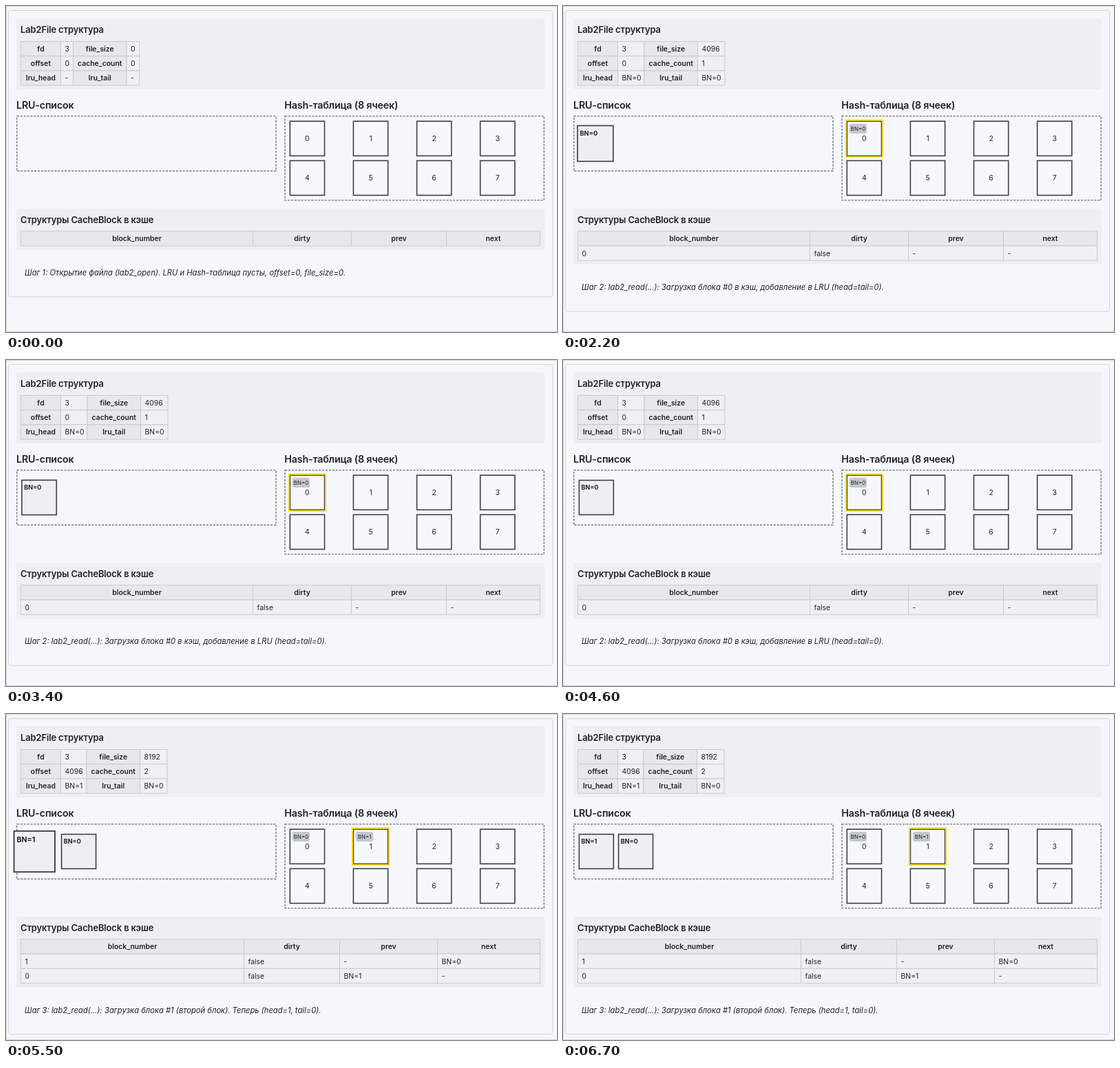
Animation of 800 by 473 pixels, one loop 8000 ms. Source, as an HTML page:

```html
<!DOCTYPE html>
<html lang="ru">
<head>
<meta charset="utf-8">
<style>
  html, body { margin: 0; width: 100%; height: 100%; overflow: hidden; background: #f5f7fb; }
  svg { display: block; width: 100vw; height: 100vh; }
  text { font: 10.4px Inter, sans-serif; fill: #1f2329; }
  .mid { text-anchor: middle; }
  .th { font-weight: 600; }
  .h3 { font-size: 13px; font-weight: 600; letter-spacing: -.15px; }
  .h2 { font-size: 14.3px; font-weight: 600; letter-spacing: -.2px; }
  .step { font-size: 11.2px; font-style: italic; }
  .label { font-size: 9px; font-weight: 700; }
  .tag { font-size: 7.9px; }
  .panel { fill: #eeeff2; }
  .frame { fill: none; stroke: #d3d5da; }
  .head { fill: #e8e8ea; stroke: #c9cacd; }
  .data { fill: #f0f0f3; stroke: #c9cacd; }
  .zone { fill: none; stroke: #85878c; stroke-width: 1.6; stroke-dasharray: 3.2 1.7; }
  .cell { fill: #f7f8fb; stroke: #3c4049; stroke-width: 1.6; }
  .block { fill: #eeeff2; stroke: #3c4049; stroke-width: 1.6; }
  .glow { fill: none; stroke: #f7d51d; stroke-width: 2; }
  .badge { fill: #c3c7ce; }
</style>
</head>
<body>
<svg id="stage" viewBox="0 0 800 473" preserveAspectRatio="none"></svg>
<script>
const LOOP = 8000, TICK = 100;

const scenes = [
  {
    cols: [21.5, 79.5, 97.5, 175, 193.5],
    info: [3, 0, 0, 0, '-', '-'],
    split: [21.5, 358.5, 501.5, 639.5, 775.5],
    rows: [], blocks: [],
    step: 'Шаг 1: Открытие файла (lab2_open). LRU и Hash-таблица пусты, offset=0, file_size=0.'
  },
  {
    start: 2110,
    cols: [21.5, 79.5, 118, 195.5, 235],
    info: [3, 4096, 0, 1, 'BN=0', 'BN=0'],
    split: [21.5, 358.5, 501.5, 639.5, 775.5],
    rows: [['0', 'false', '-', '-']], blocks: [0],
    step: 'Шаг 2: lab2_read(...): Загрузка блока #0 в кэш, добавление в LRU (head=tail=0).'
  },
  {
    start: 5090,
    cols: [21.5, 79.5, 117, 194.5, 234],
    info: [3, 8192, 4096, 2, 'BN=1', 'BN=0'],
    split: [21.5, 345.5, 484.5, 626.5, 775.5],
    rows: [['1', 'false', '-', 'BN=0'], ['0', 'false', 'BN=1', '-']], blocks: [1, 0],
    step: 'Шаг 3: lab2_read(...): Загрузка блока #1 (второй блок). Теперь (head=1, tail=0).'
  }
];

const rect = (cls, x, y, w, h, r = 0) =>
  `<rect class="${cls}" x="${x}" y="${y}" width="${w}" height="${h}" rx="${r}"/>`;
const text = (cls, x, y, s) => `<text class="${cls}" x="${x}" y="${y}">${s}</text>`;

function tableCell(x0, x1, y, h, s, head) {
  return rect(head ? 'head' : 'data', x0, y, x1 - x0, h) +
    (head ? text('th mid', (x0 + x1) / 2, y + 14.5, s) : text('', x0 + 6, y + 14.5, s));
}

function infoTable({ cols, info }) {
  const names = ['fd', 'file_size', 'offset', 'cache_count', 'lru_head', 'lru_tail'];
  return names.map((name, i) => {
    const c = i % 2 * 2, y = 51.5 + Math.floor(i / 2) * 21.2;
    return tableCell(cols[c], cols[c + 1], y, 21.2, name, true) +
      tableCell(cols[c + 1], cols[c + 2], y, 21.2, info[i]);
  }).join('');
}

function blockTable({ split, rows }) {
  const all = [['block_number', 'dirty', 'prev', 'next'], ...rows];
  return all.map((row, r) => row.map((s, c) =>
    tableCell(split[c], split[c + 1], 326.7 + r * 21.3, 21.3, s, r === 0)).join('')).join('');
}

function hashCells({ blocks }) {
  let out = '';
  for (let i = 0; i < 8; i++) {
    const x = 412.3 + i % 4 * 92.1, y = 167.2 + Math.floor(i / 4) * 57.2;
    out += rect('cell', x, y, 50.2, 50.2);
    if (blocks[0] === i) out += rect('glow', x - 1.4, y - 1.4, 53, 53);
    if (blocks.includes(i)) {
      out += rect('badge', x + 3.7, y + 3.8, 25, 14, 3) + text('tag mid', x + 16.2, y + 13.7, 'BN=' + i);
    }
    out += text('mid', x + 25.1, y + 28.9, i);
  }
  return out;
}

// Each block is drawn around its own centre.
function lruBlocks({ blocks }) {
  return blocks.map((n, i) =>
    `<g ${i ? '' : 'id="fresh"'} transform="translate(${48.4 + i * 57.2} 199.5)">` +
    rect('block', -25, -25, 50, 50) + text('label', -21.8, -11.2, 'BN=' + n) + '</g>').join('');
}

function build(scene) {
  const grow = scene.rows.length * 21.3;
  return rect('frame', .5, .5, 801, 472) +
    rect('frame', 3.5, 6.5, 790, 415.4 + grow, 3) +
    rect('panel', 15, 18, 767, 103, 3) +
    text('h3', 21, 39, 'Lab2File структура') + infoTable(scene) +
    text('h2', 15, 148.5, 'LRU-список') + text('h2', 404.3, 148.5, 'Hash-таблица (8 ячеек)') +
    rect('zone', 15.8, 159.8, 376.2, 79.6) + rect('zone', 405, 159.8, 376.2, 122) +
    hashCells(scene) + lruBlocks(scene) +
    rect('panel', 15, 294, 767, 59.6 + grow, 3) +
    text('h3', 21, 315, 'Структуры CacheBlock в кэше') + blockTable(scene) +
    text('step', 27, 391 + grow, scene.step);
}

// cubic-bezier(.25, .1, .25, 1)
function ease(x) {
  if (x <= 0) return 0;
  if (x >= 1) return 1;
  const bez = (a, b, p) => 3 * a * p * (1 - p) ** 2 + 3 * b * p * p * (1 - p) + p ** 3;
  let lo = 0, hi = 1;
  for (let i = 0; i < 24; i++) {
    const m = (lo + hi) / 2;
    if (bez(.25, .25, m) < x) lo = m; else hi = m;
  }
  return bez(.1, 1, lo);
}

const pulse = u => u < 600 ? ease(u / 600) : 1 - ease((u - 600) / 900);

const stage = document.getElementById('stage');
let shown = null;

function draw(time) {
  const t = Math.floor(time % LOOP / TICK) * TICK;
  const scene = scenes.filter(s => !s.start || t >= s.start).pop();
  if (scene !== shown) {
    stage.innerHTML = build(scene);
    shown = scene;
  }
  const fresh = document.getElementById('fresh');
  if (fresh) {
    const p = pulse(t - scene.start);
    fresh.setAttribute('transform', `translate(${48.4 - 7.6 * p} 199.5) scale(${1 + .2 * p})`);
  }
}

const origin = performance.now();
function loop() {
  draw(performance.now() - origin);
  requestAnimationFrame(loop);
}
loop();
</script>
</body>
</html>
```
